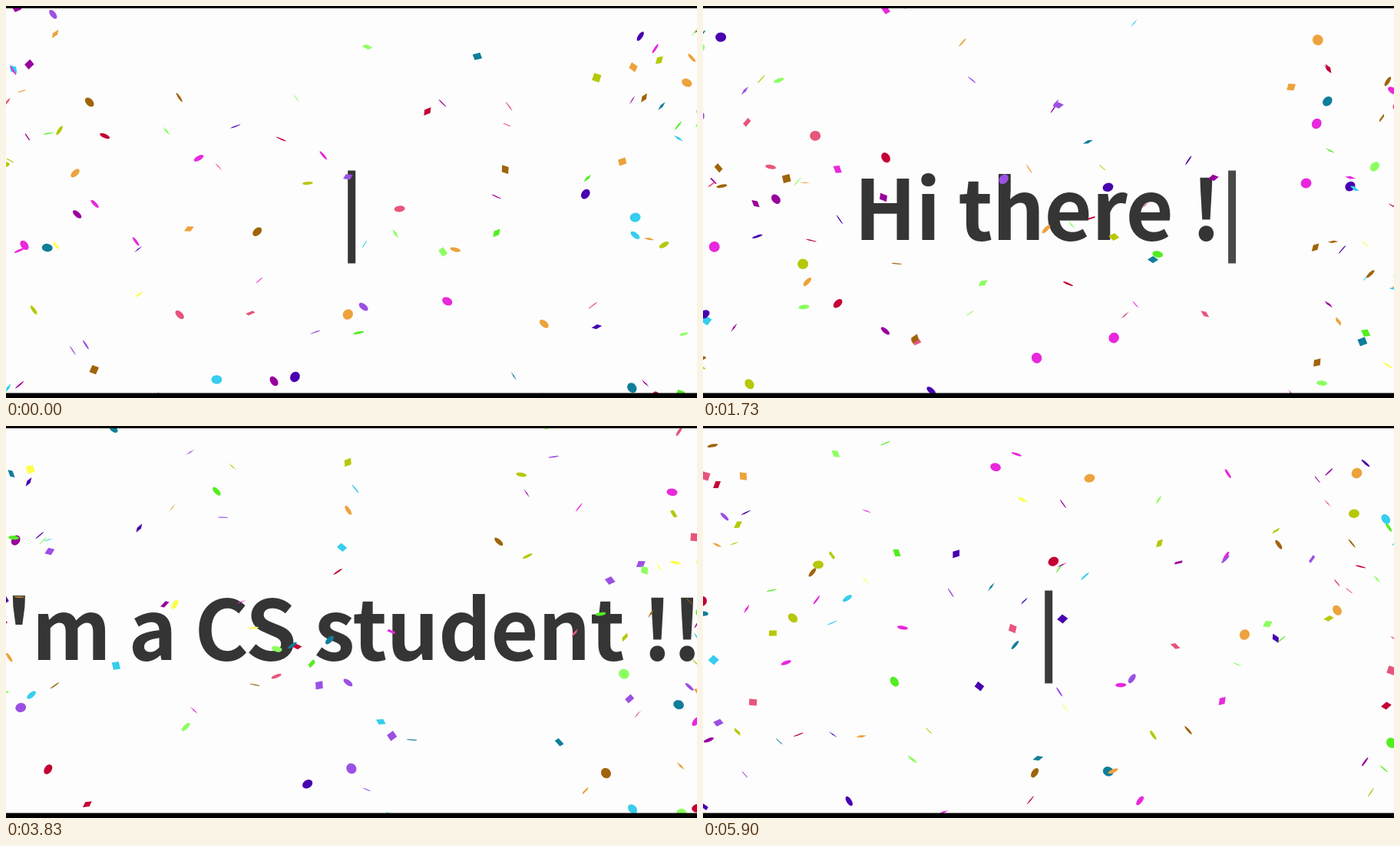
An HTML page with a canvas that plays this animation: 900 by 511 pixels, repeating every 5.93 s.

```html
<!DOCTYPE html>
<html lang="en">
<head>
<meta charset="utf-8">
<title>Typed greeting with confetti</title>
<style>
  html, body { margin: 0; width: 100%; height: 100%; overflow: hidden; background: #fdfdfd; }
  svg, canvas { position: absolute; left: 0; top: 0; width: 900px; height: 511px; display: block; }
  text {
    font: 700 107.4px "Noto Sans CJK JP", "Noto Sans CJK SC", "Noto Sans CJK KR", "Noto Sans CJK TC", "Noto Sans", sans-serif;
    letter-spacing: -0.9px;
    white-space: pre;
    text-anchor: middle;
  }
  text, rect { fill: #353535; }
</style>
</head>
<body>
<svg viewBox="0 0 900 511">
  <text id="words" x="435.5" y="305" xml:space="preserve"></text>
  <rect id="cursor" y="214.5" width="10" height="121"/>
</svg>
<canvas id="sky" width="900" height="511"></canvas>
<script>
const W = 900, H = 511, LOOP = 5930;
const words = document.getElementById('words');
const cursor = document.getElementById('cursor');
const ctx = document.getElementById('sky').getContext('2d');

// Typing: each line is typed, held, then deleted.
const TYPE = 70, HOLD = 1000, ERASE = 50;
const LINES = [
  { start: 40, text: 'Hi there !' },
  { start: 2240, text: "I'm a CS student !!" }
];

function typedAt(t) {
  const line = t < LINES[1].start ? LINES[0] : LINES[1];
  const size = line.text.length;
  const typed = Math.floor((t - line.start) / TYPE);
  const erased = Math.floor((t - line.start - size * TYPE - HOLD) / ERASE);
  const count = Math.min(size, typed) - Math.max(0, erased);
  return line.text.slice(0, Math.max(0, count));
}

// Cursor: eased fade out and back in, with a shorter first beat.
const ease = x => 1 - Math.pow(1 - Math.pow(x, 1.15), 2.2);

function cursorAlpha(t) {
  const beat = t < 890 ? t / 890 : ((t - 890) / 1000) % 1;
  return beat < 0.5 ? 1 - ease(beat * 2) : ease(beat * 2 - 1);
}

function drawText(t) {
  const text = typedAt(t);
  if (words.textContent !== text) words.textContent = text;
  const width = text ? words.getComputedTextLength() : 0;
  cursor.setAttribute('x', W / 2 + width / 2 - 4.8);
  cursor.setAttribute('opacity', cursorAlpha(t).toFixed(3));
}

// Confetti: front and back colour of each paper.
const PAPERS = [
  ['#36cdee', '#0f7e9a'], ['#9b50e4', '#4800b0'], ['#e8557c', '#c40034'],
  ['#8cff60', '#52ee20'], ['#fcff48', '#b6c80a'], ['#eda23c', '#a0640a'],
  ['#e828dc', '#98009c']
];

let seed = 20417;
function rand(min = 0, max = 1) {
  seed = (seed * 1664525 + 1013904223) % 4294967296;
  return min + (max - min) * seed / 4294967296;
}

const LEAD = 5, RATE = 38;
const pieces = Array.from({ length: Math.round((LEAD + LOOP / 1000) * RATE) }, (_, i) => ({
  born: i / RATE - LEAD,
  side: i % 2 ? 1 : -1,
  reach: 540 * Math.pow(rand(), 1.5) - 10,
  rise: rand(-20, 320),
  fall: rand(130, 215),
  sway: rand(4, 14),
  swaySpeed: rand(2, 4),
  phase: rand(0, 6.28),
  roll: rand(0, 6.28),
  rollSpeed: rand(4, 9),
  tilt: rand(0, 6.28),
  tiltSpeed: rand(2, 5),
  turn: rand(0, 6.28),
  turnSpeed: rand(-2.5, 2.5),
  skew: rand(0, 6.28),
  round: rand() < 0.6,
  paper: PAPERS[Math.floor(rand(0, PAPERS.length))]
}));

function drawPiece(p, time) {
  const age = time - p.born;
  if (age < 0) return;
  const burst = 1 - Math.exp(-4 * age);
  const inward = p.reach * burst + p.sway * Math.sin(p.phase + p.swaySpeed * age);
  const x = p.side > 0 ? inward : W - inward;
  const y = 153 - p.rise * burst + p.fall * age;
  if (y > H + 10 || y < -10) return;

  const face = Math.cos(p.roll + p.rollSpeed * age);
  const lean = Math.cos(p.tilt + p.tiltSpeed * age);
  ctx.save();
  ctx.translate(x, y);
  ctx.rotate(Math.sin(p.turn + p.turnSpeed * age));
  ctx.scale(1, Math.max(0.1, Math.abs(face * lean)));
  ctx.fillStyle = p.paper[face > 0 ? 0 : 1];
  ctx.beginPath();
  if (p.round) {
    ctx.arc(0, 0, 7, 0, 2 * Math.PI);
  } else {
    ctx.rotate(0.8 * Math.sin(p.skew + age));
    ctx.rect(-5, -5, 10, 10);
  }
  ctx.fill();
  ctx.restore();
}

function drawConfetti(t) {
  ctx.clearRect(0, 0, W, H);
  for (const p of pieces) drawPiece(p, t / 1000);
  ctx.fillStyle = '#000';
  ctx.fillRect(0, 0, W, 3);
  ctx.fillRect(0, 504.5, W, 6.5);
}

const begin = performance.now();
function frame() {
  const t = (performance.now() - begin) % LOOP;
  drawText(t);
  drawConfetti(t);
  requestAnimationFrame(frame);
}
frame();
</script>
</body>
</html>
```
